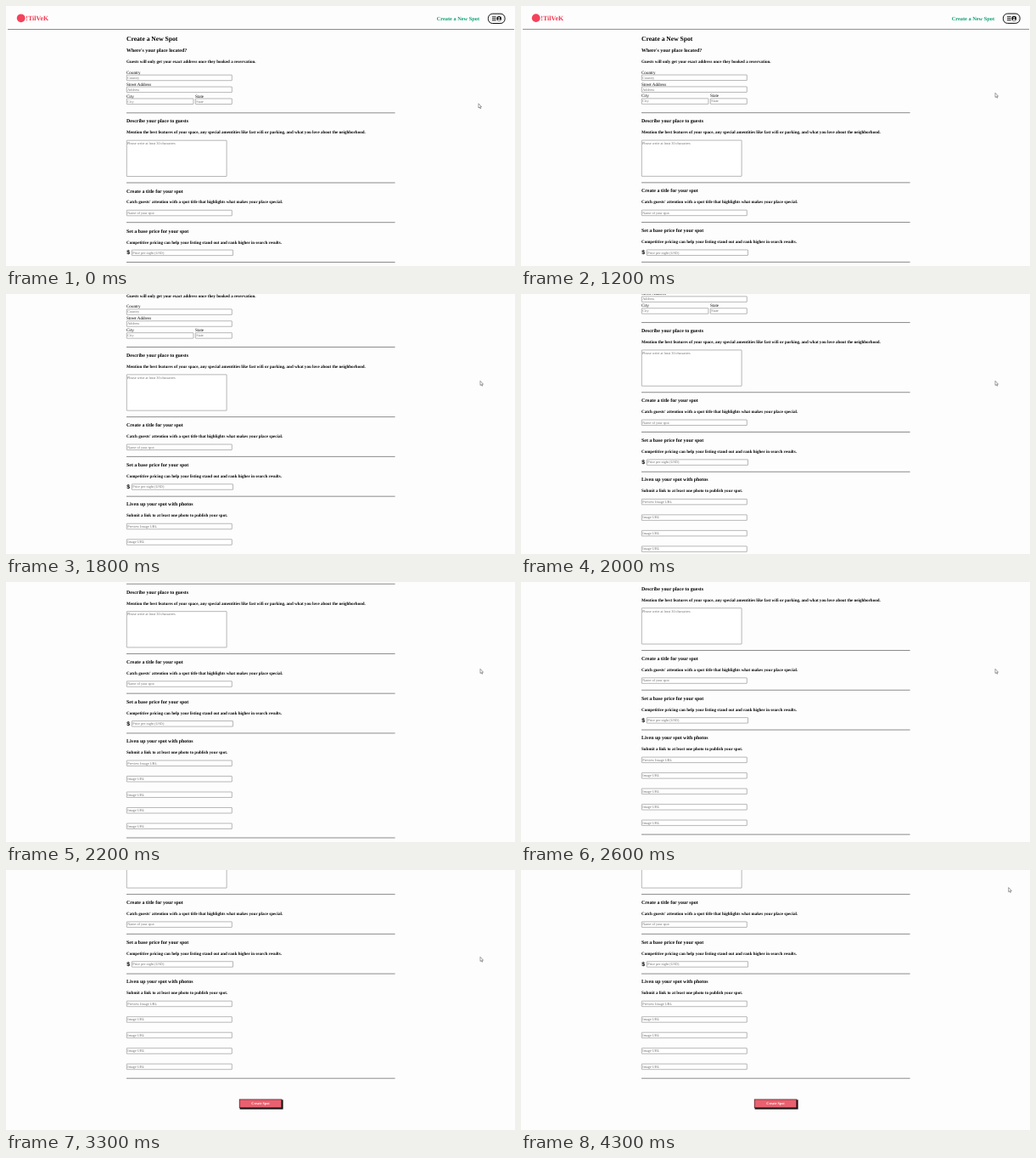
Write an HTML page that moves like this. It is 600 px wide and 306 px high and loops after 4400 ms.

```html
<!DOCTYPE html>
<html lang="en">
<head>
<meta charset="utf-8">
<title>Create a New Spot</title>
<style>
  html, body { margin: 0; width: 100%; height: 100%; overflow: hidden; background: #fefdfe; }
  svg { display: block; width: 600px; height: 306px; }
  text { font-family: "Liberation Serif", "Times New Roman", serif; text-rendering: geometricPrecision; fill: #000; }
  .h2 { font-size: 7.58px; font-weight: bold; }
  .h3 { font-size: 5.92px; font-weight: bold; }
  .h4 { font-size: 5.06px; font-weight: bold; }
  .label { font-size: 5.06px; }
  .hint { font-size: 4.21px; fill: #6c6c6c; }
  .brand { font-size: 7.9px; font-weight: bold; fill: #f23b51; }
  .link { font-size: 6.32px; font-weight: bold; fill: #0aa070; }
  .dollar { font: bold 6.8px "Liberation Sans", Arial, sans-serif; }
  .submit { font-size: 4.21px; font-weight: bold; fill: #fff; text-anchor: middle; }
  .box { fill: #fff; stroke: #7c7c7c; stroke-width: .55; }
  .rule { stroke: #555; stroke-width: .68; }
</style>
</head>
<body>
<svg viewBox="0 0 600 306">
  <g id="page">
    <circle cx="17.7" cy="14.3" r="4.9" fill="#f5425b"/>
    <rect x="568.4" y="9.1" width="19.7" height="11.4" rx="5.2" fill="#f4f4f4" stroke="#111" stroke-width="1"/>
    <path d="M573 12.8h4.6M573 14.8h4.6M573 16.8h4.6" stroke="#111" stroke-width=".9"/>
    <circle cx="581.2" cy="14.8" r="2.8" fill="#111"/>
    <circle cx="581.2" cy="14" r=".9" fill="#fff"/>
    <path d="M579.6 16.7q.2-1.2 1.6-1.2t1.6 1.2q-1.6 1.2-3.2 0z" fill="#fff"/>
    <rect x="275.6" y="449.8" width="51" height="11.2" fill="#111"/>
    <rect x="275.2" y="449.4" width="49.6" height="9.8" fill="#e9606f" stroke="#4b1c22" stroke-width=".7"/>
  </g>
  <path id="cursor" d="M0 0V5.2L1.2 4.2 2 6 2.8 5.6 2 3.9H3.6Z" fill="#fff" stroke="#444" stroke-width=".5"/>
</svg>
<script>
const page = document.getElementById('page');
const cursor = document.getElementById('cursor');
const LEFT = 142;

function add(tag, attrs, content = '') {
  const node = document.createElementNS('http://www.w3.org/2000/svg', tag);
  for (const key in attrs) node.setAttribute(key, attrs[key]);
  node.textContent = content;
  page.append(node);
}
const text = (cls, x, y, content) => add('text', { class: cls, x, y }, content);
const rule = (y, x1 = LEFT, x2 = 458.6) => add('line', { class: 'rule', x1, x2, y1: y, y2: y });
const box = (x, y, width, height) => add('rect', { class: 'box', x: x + .3, y, width, height, rx: .3 });

function field(y, hint, x = LEFT, width = 124) {
  box(x, y - 3.3, width, 6.5);
  text('hint', x + 1.3, y + 1.3, hint);
}
function section(y, title, note) {
  text('h3', LEFT, y, title);
  text('h4', LEFT, y + 12.9, note);
}

text('brand', 23.3, 17.3, '!TilVeK');
text('link', 507.8, 17.1, 'Create a New Spot');
rule(27.5, 2, 599);

text('h2', LEFT, 41.1, 'Create a New Spot');
section(54.4, "Where's your place located?",
  'Guests will only get your exact address once they booked a reservation.');
text('label', LEFT, 79.8, 'Country');
field(84.5, 'Country');
text('label', LEFT, 93.7, 'Street Address');
field(98.4, 'Address');
text('label', LEFT, 107.6, 'City');
field(112.3, 'City', LEFT, 78.6);
text('label', 223, 107.6, 'State');
field(112.3, 'State', 223, 43);
rule(125.8);

section(137.4, 'Describe your place to guests',
  'Mention the best features of your space, any special amentities like fast wifi or parking, and what you love about the neighborhood.');
box(LEFT, 158.2, 117.8, 42.3);
text('hint', LEFT + 1, 163, 'Please write at least 30 characters');
rule(208);

section(219.5, 'Create a title for your spot',
  "Catch guests' attention with a spot title that highlights what makes your place special.");
field(243.6, 'Name of your spot');
rule(254.7);

section(266.6, 'Set a base price for your spot',
  'Competitive pricing can help your listing stand out and rank higher in search results.');
text('dollar', LEFT + .2, 292.2, '$');
field(290.4, 'Price per night (USD)', 148, 119.2);
rule(301.5);

section(312.7, 'Liven up your spot with photos',
  'Submit a link to at least one photo to publish your spot.');
for (let i = 0; i < 5; i++) field(336.9 + i * 18.5, i ? 'Image URL' : 'Preview Image URL');
rule(424.6);
text('submit', 300, 455.9, 'Create Spot');

const LOOP = 4400, STEP = 100;
// Wheel notches: start, end, distance
const NOTCHES = [
  [1190, 1450, 31.6], [1430, 1700, 31.6],
  [1790, 2050, 31.6], [1980, 2250, 31.6],
  [2575, 2800, 31.6], [3065, 3300, 21.4]
];
// Pointer moves: start, end, dx, dy
const MOVES = [
  [0, 400, 2, -12.5],
  [3600, 4200, 15.5, -81],
  [4200, 4300, .2, -.7]
];

function ease(t, start, end) {
  const p = Math.min(1, Math.max(0, (t - start) / (end - start)));
  return p * p * (3 - 2 * p);
}

function draw(now) {
  const t = Math.floor(now % LOOP / STEP) * STEP;
  const scroll = NOTCHES.reduce((sum, [a, b, d]) => sum + d * ease(t, a, b), 0);
  let x = 557, y = 114.8;
  for (const [a, b, dx, dy] of MOVES) {
    const p = ease(t, a, b);
    x += dx * p;
    y += dy * p;
  }
  page.setAttribute('transform', `translate(0 ${-scroll.toFixed(2)})`);
  cursor.setAttribute('transform', `translate(${x} ${y})`);
}

let began;
function tick(now) {
  began ??= now;
  draw(now - began);
  requestAnimationFrame(tick);
}
draw(0);
requestAnimationFrame(tick);
</script>
</body>
</html>
```
